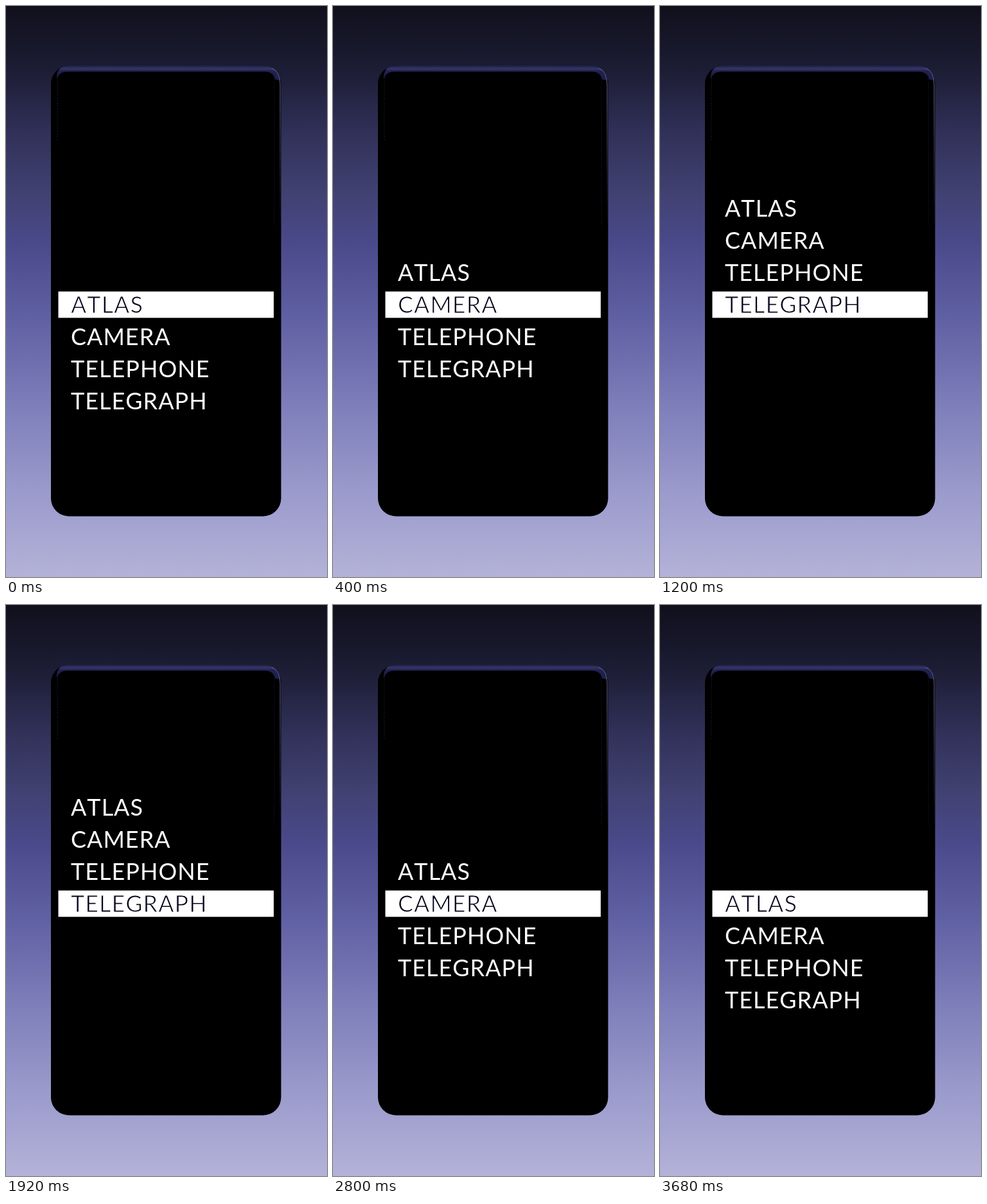
An HTML page that plays this animation: 500x889 px, repeating every 4 s.

```html
<!DOCTYPE html>
<html lang="en">
<head>
<meta charset="utf-8">
<title>Menu</title>
<style>
  html, body { margin: 0; width: 100%; height: 100%; overflow: hidden; background: #000; }
  svg { display: block; width: 100vw; height: 100vh; }
  text {
    font: 400 36px Lato, sans-serif;
    font-kerning: none;
    letter-spacing: 1px;
    fill: #fff;
  }
  /* the light outline thins the dark letters */
  .on { fill: #05051c; stroke: #fff; stroke-width: 1.1; }
</style>
</head>
<body>
<svg viewBox="0 0 500 889" preserveAspectRatio="none">
  <defs>
    <linearGradient id="sky" x2="0" y2="1">
      <stop offset="0" stop-color="#10101c"/>
      <stop offset=".11" stop-color="#1c1c34"/>
      <stop offset=".22" stop-color="#303058"/>
      <stop offset=".32" stop-color="#404070"/>
      <stop offset=".42" stop-color="#4a4a8c"/>
      <stop offset=".55" stop-color="#6060a4"/>
      <stop offset=".7" stop-color="#7e7eba"/>
      <stop offset=".85" stop-color="#9a9acc"/>
      <stop offset="1" stop-color="#b4b2d8"/>
    </linearGradient>
    <linearGradient id="rim" gradientUnits="userSpaceOnUse" x1="0" y1="93" x2="0" y2="102">
      <stop offset="0" stop-color="#20203c"/>
      <stop offset=".5" stop-color="#34346c"/>
      <stop offset="1" stop-color="#20204c"/>
    </linearGradient>
    <linearGradient id="edge" gradientUnits="userSpaceOnUse" x1="0" y1="100" x2="0" y2="345">
      <stop offset="0" stop-color="#606090"/>
      <stop offset=".2" stop-color="#606088"/>
      <stop offset="1" stop-color="#606088" stop-opacity="0"/>
    </linearGradient>
  </defs>
  <rect width="500" height="889" fill="url(#sky)"/>
  <rect x="70" y="93" width="358.5" height="701.5" rx="28"/>
  <path d="M79 114Q78 93 98 93H400Q424 93 427 116L419 114Q417 102 402 102H96Q82 102 79 114Z" fill="url(#rim)"/>
  <path d="M414 97Q427 102 427 122V345" fill="none" stroke="url(#edge)"/>
  <path d="M80 208V118Q80 102 96 102H402Q418 102 418 118V343" fill="none" stroke="#2a2a60" stroke-dasharray="1 3"/>
  <rect x="81.5" y="444.5" width="335.5" height="41" fill="#fff"/>
  <g id="menu"></g>
</svg>
<script>
  const words = ['ATLAS', 'CAMERA', 'TELEPHONE', 'TELEGRAPH'];
  const order = [0, 1, 2, 3, 3, 3, 2, 1, 0, 0];
  const stepMs = 400, rowHeight = 50, baseline = 478;
  const menu = document.getElementById('menu');

  const rows = words.map(word => {
    const row = document.createElementNS('http://www.w3.org/2000/svg', 'text');
    row.textContent = word;
    row.setAttribute('x', 101);
    return menu.appendChild(row);
  });

  function draw(ms) {
    const chosen = order[Math.floor(ms / stepMs) % order.length];
    rows.forEach((row, i) => {
      row.setAttribute('y', baseline + (i - chosen) * rowHeight);
      row.setAttribute('class', i === chosen ? 'on' : '');
    });
  }

  const start = performance.now();
  function tick() {
    draw(performance.now() - start);
    requestAnimationFrame(tick);
  }
  tick();
</script>
</body>
</html>
```
